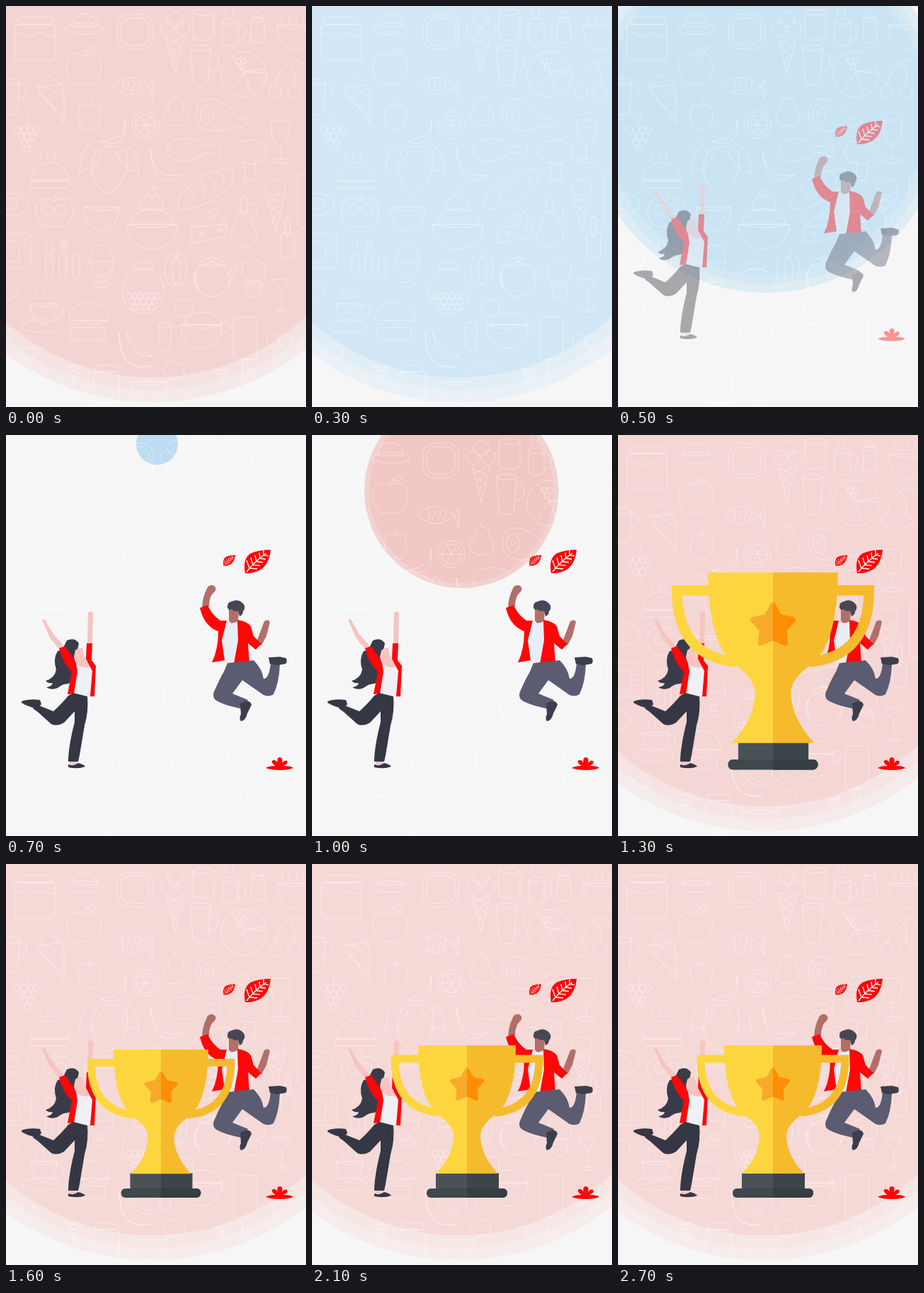
Animation, 424 px wide and 566 px high, one loop 3600 ms. Source, as an HTML page:

```html
<!DOCTYPE html>
<html lang="en">
<head>
<meta charset="utf-8">
<title>Celebration</title>
<style>
html, body { margin: 0; height: 100%; overflow: hidden; background: #f6f6f6; }
svg { display: block; width: 100vw; height: 100vh; }
#doodles { fill: none; stroke: #fff; opacity: .42; stroke-linejoin: round; }
.red { fill: #fd0709; }
.star { stroke-width: 6; stroke-linejoin: round; }
</style>
</head>
<body>
<svg viewBox="0 0 424 566">
<g id="disc"><circle class="ring" r="1"/><circle class="ring" r=".95"/><circle r=".9"/></g>
<path id="doodles"/>

<g id="people">
  <!-- woman -->
  <path fill="#3a3b49" d="M86 290Q97 285 103 294L101 304 97 332Q97 348 88 351 80 351 73 357 64 361 57 356 65 355 66 350 60 351 56 347 69 343 71 331 66 316 73 305 80 304 82 298Z"/>
  <path fill="#f4c5c1" d="M51 261q4-3 6 3l9 16 15 17-6 5-13-16zM116 251q4-4 7 0l-1 45-7-1zM98 304q4-4 10-3l2 9 4 9 10 6-8 14-16-6-4-20zM90 458h10v7H90z"/>
  <path fill="#eff0f5" d="M100 322q8 9 20 5l3 8-3 32-8 3-14-6z"/>
  <path class="red" d="M75 301l8-3q9 10 16 24l2 12-5 31-9 1 6-32q-13-12-18-33zM114 294h8l-1 24 6 8-2 43h-6l3-36-9-17z"/>
  <path fill="#363744" d="M95 364L115 369Q117 390 111 410L104 452 102 461H88Q88 440 97 405L97 390 82 406Q72 412 64 408L45 391 38 386 42 380 67 390Q80 378 88 368ZM22 376q10-4 26-2l2 6-6 6q-12-2-22-8zM88 465q8 3 14-2 8 2 10 5-10 4-24 1z"/>
  <!-- man -->
  <path fill="#b26f69" d="M283 219q2-8 9-7 7 3 3 9-8 6-8 21l-10 2q1-16 6-25zM315 246q6-4 14 0l-1 18-8 4-5-6zM365 263q6-4 8 1l-5 20-7 13-7-5z"/>
  <path fill="#e9edf6" d="M310 263q8 5 17 0l1 57q-10 4-22 0z"/>
  <path class="red" d="M274 244l11-4q6 14 18 22h9L305 290 309 318 291 321Q300 303 300 277 280 270 274 244ZM327 261Q341 263 346 270L350 284 361 295 353 303 342 294 344 321 322 323 328 290Z"/>
  <path fill="#464755" d="M313 244q-1-8 6-9 8-4 14 1 8 6 2 13 0 5-5 7l-2-8q-6 2-9-2-4 2-6-2z"/>
  <path fill="#5b5b71" d="M313 322L350 318Q362 330 364 344 372 344 374 322L387 324Q386 350 378 366 372 370 364 367L334 346 320 365 342 374 337 387Q308 382 296 374 290 368 296 358 302 344 308 334Z"/>
  <path fill="#3d3e4c" d="M331 379l7-3q8-1 9 5l-6 12q-2 10-9 11-3-4 0-10zM371 314l16-1 9 2q2 6-1 8l-12 2-10-2z"/>
  <!-- leaves and sprout -->
  <g id="leaf">
    <path class="red" d="M338 195Q334 174 346 167 358 162 374 162 372 182 360 190 350 196 338 195Z"/>
    <path id="veins" fill="none" stroke="#fff" stroke-width="1.4"/>
  </g>
  <use href="#leaf" transform="translate(152 95) scale(.46)"/>
  <path class="red" d="M367 470q4-3 14-3-8-5-4-8 4-1 7 4-2-8 3-8t3 8q4-5 7-3 3 4-5 7 12 0 14 3-6 3-19 3t-20-3z"/>
</g>

<g id="base">
  <path fill="#4a5258" d="M175 436h44v23h-44z"/><path fill="#3c454a" d="M219 436h45v23h-45z"/>
  <g id="plate"><rect x="162" y="458" width="114" height="13" rx="6" fill="#3f484d"/><path fill="#353e43" d="M219 458h51q6 1 6 6t-6 7h-51z"/></g>
</g>
<g id="cup">
  <path fill="none" stroke="#fdd63f" stroke-width="11" d="M154 275H117Q117 345 180 351"/>
  <path fill="none" stroke="#f6bb2d" stroke-width="11" d="M284 275H321Q321 345 258 351"/>
  <path fill="#fdd63f" d="M219 256H150Q150 328 176 352 200 368 200 384 199 412 175 437H219z"/>
  <path fill="#f6bb2d" d="M219 256H288Q288 328 262 352 238 368 238 384 239 412 263 437H219z"/>
  <clipPath id="right"><path d="M219 270h50v90h-50z"/></clipPath>
  <path class="star" fill="#f8aa2a" stroke="#f8aa2a"/>
  <path class="star" fill="#ff8e05" stroke="#ff8e05" clip-path="url(#right)"/>
</g>
</svg>
<script>
const $ = id => document.getElementById(id);
const LOOP = 3600, STEP = 100, CX = 219, FULL = 350;

// Food doodles: each helper appends one outline; x is the middle, y the top
let ink = '';
const pen = d => ink += d;
const repeat = (n, f) => { for (let i = 0; i < n; i++) f(i); };
const oval = (x, y, rx, ry = rx) => pen(`M${x - rx} ${y}a${rx} ${ry} 0 1 0 ${2 * rx} 0a${rx} ${ry} 0 1 0 ${-2 * rx} 0`);
const box = (x, y, w, h) => pen(`M${x - w / 2} ${y + 5}q0-5 5-5h${w - 10}q5 0 5 5v${h - 10}q0 5-5 5h${10 - w}q-5 0-5-5z`);
const glass = (x, y, w, h, taper = .1) => {
  oval(x, y + 4, w / 2, 4);
  pen(`M${x - w / 2} ${y + 4}l${w * taper} ${h - 7}q${w * (.5 - taper)} 7 ${w * (1 - 2 * taper)} 0l${w * taper} ${7 - h}`);
};
const bowl = (x, y, w, h) => pen(`M${x - w / 2} ${y}h${w}c0 ${h * 1.33} ${-w} ${h * 1.33} ${-w} 0q${w / 2} 10 ${w} 0`);
const dome = (x, y, w, h) => pen(`M${x - w / 2} ${y + h}c0 ${-h * 1.33} ${w} ${-h * 1.33} ${w} 0z`);
const pear = (x, y, w, h) => pen(`M${x} ${y}c${w * .4} 0 ${w * .2} ${h * .3} ${w * .42} ${h * .5}c${w * .2} ${h * .3} 0 ${h * .5} ${-w * .42} ${h * .5}s${-w * .62} ${-h * .2} ${-w * .42} ${-h * .5}c${w * .22} ${-h * .2} ${w * .02} ${-h * .5} ${w * .42} ${-h * .5}`);
const heart = (x, y, w, h) => pen(`M${x} ${y + h * .12}c${-w * .7} ${-h * .4} ${-w * .65} ${h * .9} ${-w * .15} ${h * .88}q${w * .15}-4 ${w * .3} 0c${w * .5} 0 ${w * .55} ${-h * 1.3} ${-w * .15} ${-h * .88}q0-9 6-12`);
const handle = (x, y, h) => pen(`M${x} ${y}q12-2 11 ${h / 2}t-12 ${h / 2}`);
const steam = (x, y, n) => repeat(n, i => pen(`M${x + i * 10} ${y}q-5-6 1-12`));
const cone = (x, y, w, h) => {
  pen(`M${x - w / 2} ${y}l${w / 2} ${h} ${w / 2} ${-h}`);
  repeat(3, i => pen(`M${x - w * (.4 - i * .12)} ${y + h * (i * .24 + .1)}l${w * (.7 - i * .22)} ${h * .14}m0 ${-h * .2}l${-w * (.7 - i * .22)} ${h * .2}`));
};
const crescent = (x0, y0, x1, y1, dx, dy, fat) =>
  pen(`M${x0} ${y0}Q${x0 + dx} ${y0 + dy} ${x1} ${y1}Q${x0 + dx * fat} ${y0 + dy * fat} ${x0} ${y0}`);
const pile = (x, y, rows, n, r) => repeat(rows, j => repeat(n - j, i => oval(x + (i - (n - j - 1) / 2) * 2 * r, y + j * 2 * r, r)));
const puff = (x, y, rx, ry, lobes) => {
  repeat(49, i => {
    const a = i * Math.PI / 24, k = .82 + .18 * Math.abs(Math.sin(a * lobes / 2));
    pen(`${i ? 'L' : 'M'}${(x + rx * k * Math.cos(a)).toFixed(1)} ${(y + ry * k * Math.sin(a)).toFixed(1)}`);
  });
};
const stemmed = (x, y, w, h) => {
  pen(`M${x - w / 2} ${y}h${w}q2 ${h * .55} ${-w / 2} ${h * .58}t${-w / 2} ${-h * .58}M${x} ${y + h * .58}v${h * .35}`);
  oval(x, y + h * .96, w * .55, 3);
};

// Upper third
box(42, 16, 50, 10); box(41, 26, 57, 51); pen('M14 40q7-4 14 0t14 0 14 0 13 0');
oval(111, 32, 26, 8); dome(111, 11, 36, 18);
puff(182, 36, 29, 28, 4); puff(182, 36, 23, 22, 4);
oval(239, 19, 11); oval(228, 32, 10); oval(250, 32, 10); cone(239, 43, 26, 52);
glass(279, 5, 30, 43, 0); glass(317, 18, 22, 38, 0); handle(328, 28, 20); steam(312, 14, 2);
dome(356, 8, 14, 9); glass(356, 15, 17, 37, -.1);
bowl(408, 27, 50, 35); steam(392, 22, 4);
heart(110, 66, 46, 45); pen('M114 64q8-10 14-5-2 8-14 5');
glass(275, 55, 29, 57, .15); handle(289, 68, 24);
pen('M368 94A32 32 0 1 1 367 88L336 93zM336 93l-17-24M336 93l-16 24M336 93l10 28'); pile(332, 78, 2, 2, 4);
oval(380, 121, 9); oval(407, 121, 9); pen('M380 112q6-26 20-31M407 112q4-18-5-31M396 80q14-8 28 3');
pen('M44 115l38 50v-40l-4-14-20-14zl34-4M44 122l38 34M50 111l32 18');
glass(5, 103, 28, 50); handle(18, 111, 18);
pen('M149 113q24-24 52 0l6-11v29l-6-18q-26 24-52 0M163 103q6 10 0 20'); repeat(3, i => pen(`M${172 + i * 8} 106q4 4 0 8t0 7`));
heart(118, 138, 30, 37); crescent(168, 160, 133, 191, 6, 44, .6);
oval(197, 168, 19); oval(197, 168, 14); repeat(3, i => { const a = i * 1.05; pen(`M${197 + 14 * Math.cos(a)} ${168 + 14 * Math.sin(a)}L${197 - 14 * Math.cos(a)} ${168 - 14 * Math.sin(a)}`); });
pear(240, 130, 34, 39); pen('M240 130q-4-6-1-8');
pen('M282 132c20-4 40 14 48 28 8-6 14-2 12 4q-2 4-6 4-4 6-8 0-26 14-48 5c-16-10-14-37 2-41z'); oval(284, 153, 9, 13); oval(284, 152, 3);

// Middle third
pile(30, 175, 4, 4, 4.5); pen('M30 170l2-16'); stemmed(388, 161, 26, 60);
pen('M104 236c0-14 4-34 14-42q6 6 8 14c6-10 32-16 44 0l4-9c10 6 14 26 14 37q-10-6-18-4-4 20-22 32h-5q-20-10-22-32-8-4-17 4zM126 208q-6 14-5 24M170 208q3 14 0 24M121 230q12-14 16-26M171 230q-12-14-16-26');
crescent(204, 202, 250, 238, 4, 46, 1.4);
pen('M252 187c-30 0-32 32-4 32q18 0 32-12h14q2 8 8 5 4-4 0-7 4-6 1-10-6-4-9 3h-14q-12-12-28-11z');
puff(344, 206, 26, 18, 7); pen('M338 222l-1 24h14l2-24');
dome(62, 221, 54, 25); box(62, 247, 58, 10); steam(50, 218, 3);
pen('M243 276c8-24 46-46 72-46q10 6 4 20c-16 22-46 36-70 37q-8-2-6-11z'); repeat(4, i => pen(`M${258 + i * 14} ${257 - i * 8}q10 6 8 18`));
heart(68, 270, 50, 42); oval(59, 288, 8, 7); oval(77, 288, 8, 7);
bowl(135, 284, 49, 33); repeat(4, i => pen(`M${120 + i * 10} 298v2m5 6v2`));
oval(5, 280, 26, 16); oval(5, 279, 12, 8);
bowl(206, 308, 72, 35); dome(206, 286, 60, 22); dome(206, 266, 34, 22); oval(206, 265, 6); pen('M206 259q4-4 10-2');
pen('M262 312l34-26 16 22-2 18-48 9zl50-4'); oval(292, 298, 4); oval(277, 322, 3); oval(302, 316, 3);
pear(336, 290, 38, 50); box(336, 269, 10, 24); handle(344, 280, 24);
puff(381, 256, 15, 12, 5); cone(381, 265, 28, 53);
box(398, 297, 7, 28); box(398, 320, 19, 36); box(427, 237, 30, 76);

// Lower third
box(10, 321, 50, 48); box(5, 332, 28, 30); repeat(3, i => pen(`M24 ${330 + i * 8}h6`));
oval(61, 342, 5, 12); repeat(3, i => box(61 + i * 19, 352, 10, 31)); repeat(3, i => pen(`M${78 + i * 4} 330v16`));
oval(135, 359, 17, 22); pen('M118 362h34M132 382v8M138 382v8'); oval(135, 393, 12, 4);
box(194, 362, 28, 10); oval(194, 402, 30, 32); pile(194, 409, 3, 6, 4);
heart(240, 350, 30, 45); oval(241, 374, 6, 20);
oval(291, 386, 25, 24); dome(291, 356, 38, 10); oval(291, 357, 4); pen('M310 384l12-19 5 4-13 24'); crescent(270, 374, 272, 400, -10, 14, .5);
puff(350, 374, 18, 18, 6); glass(350, 388, 24, 23, .1);
pen('M376 386h26l-12 18zM390 404v25'); oval(390, 430, 9, 2); puff(4, 402, 14, 13, 6);
bowl(53, 420, 37, 28); handle(70, 424, 18); oval(50, 452, 28, 9); steam(44, 414, 3);
dome(117, 418, 56, 26); pen('M89 447q7 6 14 0t14 0 14 0 14 0'); box(116, 454, 48, 18);
crescent(160, 460, 205, 508, 0, 58, 1); crescent(170, 458, 207, 494, 6, 40, .5);
glass(225, 446, 18, 41); dome(278, 432, 52, 18); bowl(276, 450, 58, 33); handle(305, 446, 14); puff(252, 426, 14, 14, 4);
box(338, 439, 33, 60); box(338, 498, 8, 26); pile(386, 472, 2, 2, 9);
box(142, 507, 32, 9); box(142, 516, 36, 44); bowl(202, 530, 52, 28); puff(238, 514, 16, 13, 5); cone(308, 510, 26, 22); oval(32, 490, 12, 8); cone(98, 504, 28, 28);
$('doodles').setAttribute('d', ink);

// Leaf veins along the midrib
let veins = 'M340 193Q352 178 368 167';
repeat(5, i => veins += `M${344 + i * 5} ${188 - i * 4.6}l${i - 4} ${i - 11}m${4 - i} ${11 - i}l${11 - i} 1`);
$('veins').setAttribute('d', veins);

const points = Array.from({ length: 10 }, (_, i) => {
  const r = i % 2 ? 12 : 22, a = Math.PI * (i / 5 - .5);
  return [CX + r * Math.cos(a), 313 + r * Math.sin(a)];
});
for (const el of document.querySelectorAll('.star')) el.setAttribute('d', `M${points.join('L')}Z`);

const clamp = u => Math.min(1, Math.max(0, u));
const easeInOut = u => u < .5 ? (2 * u) ** 2.3 / 2 : 1 - (2 - 2 * u) ** 2.3 / 2;
// Damped swing around 1
const spring = u => u > 0 ? 1 - (1 - u) ** 1.6 * Math.cos(8.45 * u) : 0;

function pose(id, s, pivotY, dy) {
  $(id).setAttribute('transform', `translate(${CX} ${pivotY + dy}) scale(${s}) translate(${-CX} ${-pivotY})`);
}

function draw(t) {
  const shrinking = t < 800;
  const size = shrinking ? 1 - easeInOut(clamp((t - 300) / 520)) : easeInOut(clamp((t - 775) / 500));
  const r = FULL * size;
  const hue = shrinking && t >= 300 ? '203 65%' : '3 60%';
  const light = 83.5 + 5.5 * size + 1.2 * clamp((t - 1100) / 400);
  $('disc').setAttribute('transform', `translate(${214 - 7 * size} ${.614 * r - 5.6}) scale(${r})`);
  $('disc').setAttribute('fill', `hsl(${hue} ${light}%)`);
  for (const ring of document.querySelectorAll('.ring')) ring.setAttribute('opacity', 1 - .65 * size);

  $('people').setAttribute('opacity', clamp((t - 300) / 400) ** 1.3);

  const cup = spring(clamp((t - 1065) / 935));
  const base = 1 - .35 * (1 - cup), drop = 9 * Math.max(0, 1 - base);
  $('base').setAttribute('opacity', cup > 0 ? 1 : 0);
  $('plate').setAttribute('opacity', cup > .2 ? 1 : 0);
  pose('base', base, 458, drop);
  pose('cup', cup, 436, drop + 22 * (1 - base));
}

function tick() {
  const t = performance.now() % LOOP;
  draw(Math.floor(t / STEP) * STEP);
  requestAnimationFrame(tick);
}
tick();
</script>
</body>
</html>
```
